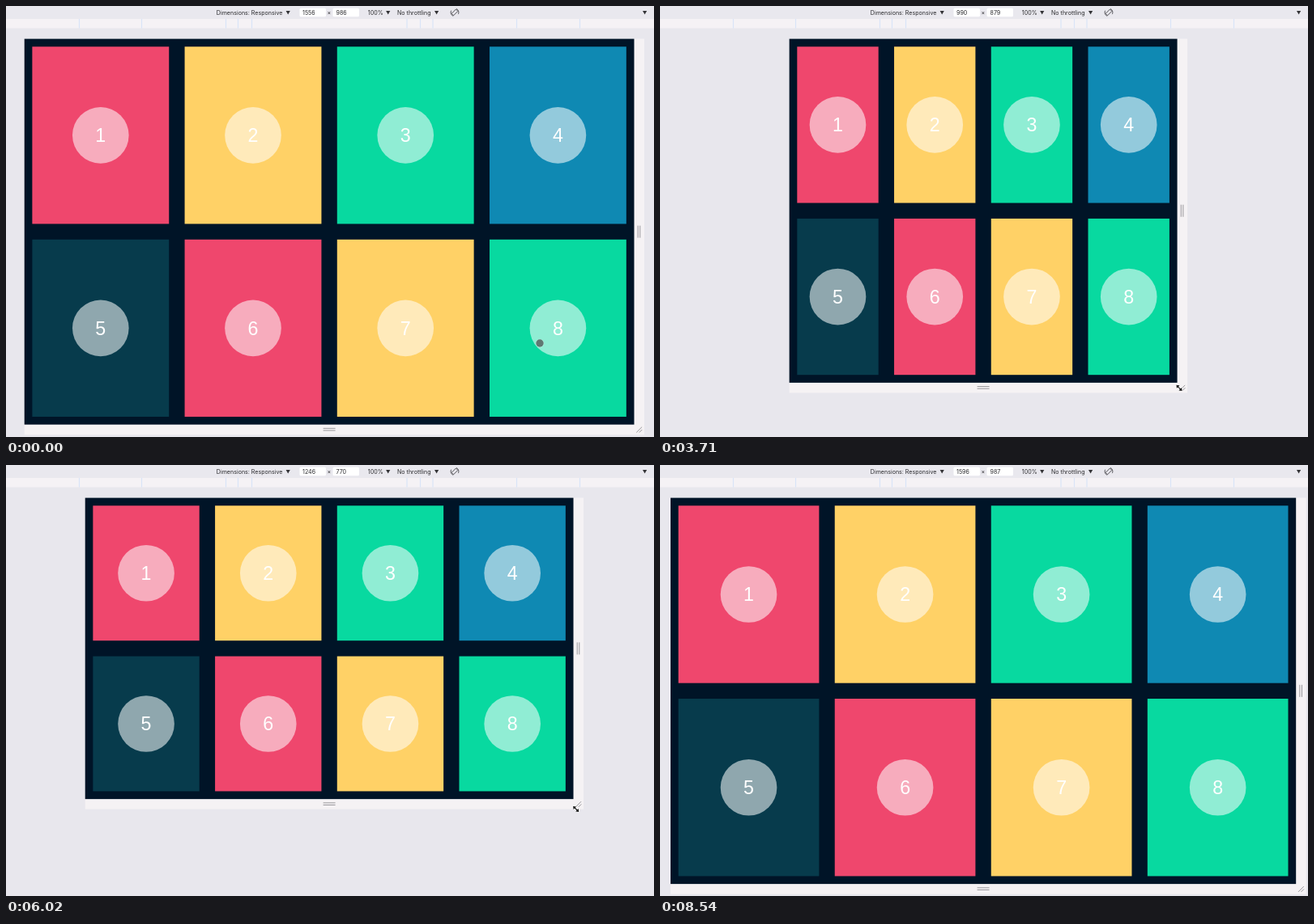
Recreate the animation shown at these times as an HTML page with a canvas. Size 800 by 533 pixels, loop 9.38 s.

```html
<!DOCTYPE html>
<html lang="en">
<head>
<meta charset="utf-8">
<title>Responsive grid</title>
<style>
  html, body { margin: 0; width: 100%; height: 100%; overflow: hidden; background: #e8e7ed; }
  canvas { display: block; width: 800px; height: 533px; }
</style>
</head>
<body>
<canvas id="stage"></canvas>
<script>
const LOOP = 9380, STEP = 70;
const SCALE = 0.4838;          // stage pixels per viewport pixel
const MID = 399.1, TOP = 40.6; // viewport anchor
const GAP = 20 * SCALE, RADIUS = 72 * SCALE, BAR = 12.5;
const COLORS = ['#ef476d', '#ffd166', '#08d9a0', '#0f89b3', '#073b4c'];
const TICKS = [90.5, 167.5, 271.5, 286.5, 303.5, 495, 511.5, 527, 630.5, 708.5];

// time, then values
const SIZE = [
  [3150, 1556, 986], [3710, 990, 879], [4130, 800, 870], [4550, 915, 885],
  [5390, 1352, 683], [5670, 1430, 676], [6160, 1200, 820], [6580, 1287, 952],
  [7000, 1470, 980], [7630, 1596, 987]
];
const ARRIVE = [
  [0, 659, 417], [420, 690, 442], [840, 760, 506], [1190, 781, 523], [1330, 781, 523], [1540, 782, 524]
];
const LEAVE = [[7770, 792, 525], [8120, 766, 330], [8540, 700, -20]];

const canvas = document.getElementById('stage');
const ctx = canvas.getContext('2d');
const dpr = window.devicePixelRatio || 1;
canvas.width = 800 * dpr;
canvas.height = 533 * dpr;

// Smooth curve through the keys that never overshoots them
function curve(keys, t, c) {
  const last = keys.length - 1;
  if (t <= keys[0][0]) return keys[0][c];
  if (t >= keys[last][0]) return keys[last][c];
  let i = 0;
  while (t > keys[i + 1][0]) i++;
  const slope = k => (keys[k + 1][c] - keys[k][c]) / (keys[k + 1][0] - keys[k][0]);
  const tangent = k => {
    if (k === 0 || k === last) return 0;
    const a = slope(k - 1), b = slope(k);
    return a * b <= 0 ? 0 : 2 * a * b / (a + b);
  };
  const span = keys[i + 1][0] - keys[i][0];
  const u = (t - keys[i][0]) / span, v = 1 - u;
  return keys[i][c] * (1 + 2 * u) * v * v + keys[i + 1][c] * u * u * (3 - 2 * u)
    + span * (tangent(i) * u * v * v - tangent(i + 1) * u * u * v);
}

const sizeAt = t => [Math.round(curve(SIZE, t, 1)), Math.round(curve(SIZE, t, 2))];

function rect(x, y, w, h, color) {
  ctx.fillStyle = color;
  ctx.fillRect(x, y, w, h);
}

function disc(x, y, r, color) {
  ctx.fillStyle = color;
  ctx.beginPath();
  ctx.arc(x, y, r, 0, Math.PI * 2);
  ctx.fill();
}

function poly(points, color) {
  ctx.fillStyle = color;
  ctx.beginPath();
  points.forEach(([x, y]) => ctx.lineTo(x, y));
  ctx.closePath();
  ctx.fill();
}

function line(x1, y1, x2, y2, color, width) {
  ctx.strokeStyle = color;
  ctx.lineWidth = width;
  ctx.beginPath();
  ctx.moveTo(x1, y1);
  ctx.lineTo(x2, y2);
  ctx.stroke();
}

function label(text, x) {
  ctx.fillStyle = '#2b2b2e';
  ctx.fillText(text, x, 10.6);
}

function drop(x) {
  poly([[x - 2.6, 6], [x + 2.6, 6], [x, 10.4]], '#333336');
}

function rotateIcon(x, y) {
  ctx.save();
  ctx.translate(x, y);
  ctx.strokeStyle = '#4a4a4e';
  ctx.lineWidth = 0.9;
  ctx.beginPath();
  ctx.arc(0, 0, 4.9, Math.PI * 0.62, Math.PI * 1.15);
  ctx.stroke();
  ctx.beginPath();
  ctx.arc(0, 0, 4.9, -Math.PI * 0.38, Math.PI * 0.15);
  ctx.stroke();
  ctx.rotate(Math.PI / 4);
  ctx.strokeRect(-1.7, -3.8, 3.4, 7.6);
  ctx.restore();
}

function toolbar(w, h) {
  rect(0, 0, 800, 16, '#e9e8ee');
  rect(0, 16, 800, 11.5, '#f5f2f5');
  TICKS.forEach(x => rect(x - 0.6, 16, 1.2, 11.5, '#d9e4f7'));
  ctx.font = '7.1px Inter, "Liberation Sans", sans-serif';
  ctx.textAlign = 'left';
  ctx.textBaseline = 'alphabetic';
  label('Dimensions: Responsive', 259.8);
  for (const x of [362.5, 403.5]) {
    ctx.fillStyle = '#fff';
    ctx.beginPath();
    ctx.roundRect(x, 2.8, 32.5, 10.4, 1.5);
    ctx.fill();
  }
  label(w, 366);
  label('×', 396.6);
  label(h, 407.5);
  label('100%', 446.8);
  label('No throttling', 483);
  [348.2, 471.7, 531.6, 788.6].forEach(drop);
  rotateIcon(554, 7.9);
}

function viewport(w, h, hover) {
  const vw = w * SCALE, vh = h * SCALE;
  const x = MID - vw / 2, right = x + vw, bottom = TOP + vh;
  rect(x, TOP, vw + BAR, vh + BAR, hover ? '#dcdbdf' : '#f5f2f4');
  rect(x, TOP, vw, vh, '#001427');

  const cw = vw / 4, ch = vh / 2;
  ctx.font = `${48 * SCALE}px "Liberation Sans", Arial, sans-serif`;
  ctx.textAlign = 'center';
  for (let i = 0; i < 8; i++) {
    const cx = x + (i % 4) * cw, cy = TOP + (i >> 2) * ch;
    rect(cx + GAP, cy + GAP, cw - 2 * GAP, ch - 2 * GAP, COLORS[i % 5]);
    disc(cx + cw / 2, cy + ch / 2, RADIUS, 'rgba(255,255,255,.55)');
    ctx.fillStyle = '#fff';
    ctx.fillText(i + 1, cx + cw / 2, cy + ch / 2 + 8.3);
  }

  const grip = '#8f8e92', my = TOP + vh / 2;
  for (const d of [4.7, 7.3]) {
    line(right + d, my - 7.5, right + d, my + 7.5, grip, 0.9);
    line(MID - 7.5, bottom + d, MID + 7.5, bottom + d, grip, 0.9);
  }
  line(right + 2.8, bottom + 9.8, right + 9.6, bottom + 3, grip, 0.9);
  line(right + 6.3, bottom + 9.8, right + 9.8, bottom + 6.3, grip, 0.9);
  return { right, bottom };
}

function resizeCursor(x, y) {
  ctx.save();
  ctx.translate(x, y);
  ctx.rotate(Math.PI / 4);
  const shape = g => [
    [-5 - g, 0], [-1.8, -2.5 - g], [-1.8, -0.6 - g], [1.8, -0.6 - g], [1.8, -2.5 - g],
    [5 + g, 0], [1.8, 2.5 + g], [1.8, 0.6 + g], [-1.8, 0.6 + g], [-1.8, 2.5 + g]
  ];
  poly(shape(0.6), '#fff');
  poly(shape(0), '#111');
  ctx.restore();
}

function arrowCursor(x, y) {
  const shape = [[0, 0], [0, 9], [2.1, 7.1], [3.6, 10.3], [5, 9.7], [3.6, 6.6], [6.4, 6.4]];
  poly(shape.map(([a, b]) => [x + a, y + b]), '#111');
}

function touchCursor(x, y) {
  disc(x, y, 5.3, 'rgba(255,255,255,.3)');
  disc(x, y, 4.7, 'rgba(65,72,70,.72)');
}

function pointer(t, box) {
  if (t >= 8540) return;
  if (t > 3150 && t <= 7770) {
    // The hand runs slightly ahead of the resized box
    const [w, h] = sizeAt(t + 30);
    resizeCursor(MID + w * SCALE / 2 + 7, TOP + h * SCALE + 7);
    return;
  }
  const path = t <= 3150 ? ARRIVE : LEAVE;
  const x = curve(path, t, 1), y = curve(path, t, 2);
  if (x < box.right && y < box.bottom && y > TOP) touchCursor(x, y);
  else if (y < TOP) arrowCursor(x, y);
  else resizeCursor(x, y);
}

function draw(now) {
  const t = Math.floor(now % LOOP / STEP) * STEP;
  const [w, h] = sizeAt(t);
  ctx.setTransform(dpr, 0, 0, dpr, 0, 0);
  rect(0, 0, 800, 533, '#e8e7ed');
  toolbar(w, h);
  pointer(t, viewport(w, h, t >= 2100 && t <= 3150));
}

let start = null;
function tick(now) {
  if (start === null) start = now;
  draw(now - start);
  requestAnimationFrame(tick);
}
draw(0);
requestAnimationFrame(tick);
</script>
</body>
</html>
```
